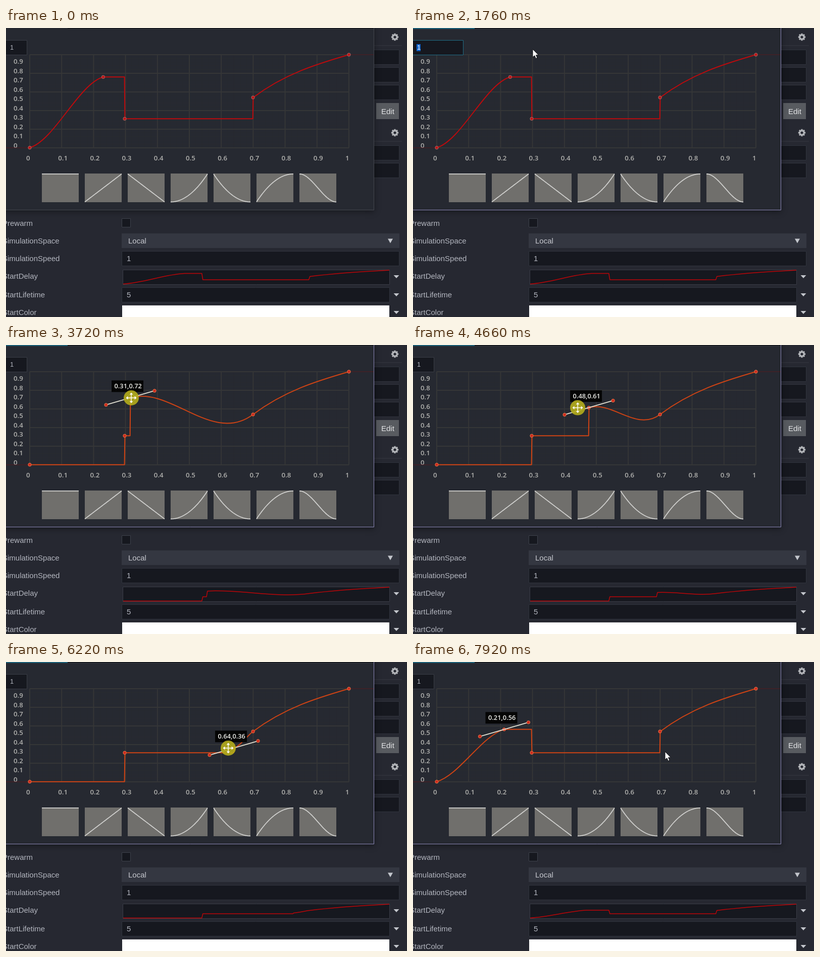
An HTML page with a canvas that plays this animation: 794x574 px, repeating every 8000 ms.

```html
<!DOCTYPE html>
<html lang="en">
<head>
<meta charset="utf-8">
<title>Curve editor</title>
<style>
html, body { margin: 0; width: 100%; height: 100%; overflow: hidden; background: #262831; }
canvas { display: block; width: 794px; height: 574px; }
</style>
</head>
<body>
<canvas id="stage" width="794" height="574"></canvas>
<script>
const ctx = document.getElementById('stage').getContext('2d');
const LOOP = 8000, STEP = 78.2, FIRST = 120;
const UI = '"Liberation Sans", Arial, sans-serif';
const NUM = '"Open Sans", "Noto Sans", sans-serif';
const DARK = '#16181f', EDGE = '#31343e', TEXT = '#b3b6bf';

// Events of the session, in ms
const HOVER = 885, FOCUS = 965, BLUR = 1912, GRAB = 3242, RELEASE = 7292;

// Free pointer: time, x, y
const roam = [
  [FIRST, 767, 556], [890, 26, 38], [1450, 26, 38], [1760, 237, 42], [2140, 237, 42],
  [2290, 191, 109], [2600, 187, 98], [RELEASE, 176, 134], [7840, 499, 178]
];

// Dragged key: time, x, y, and how far the pointer runs ahead in x
const drag = [
  [3400, 192.4, 97.4, -5], [3717, 246, 105, 2], [4380, 432, 112, -4], [4656, 348, 124.6, -22],
  [5300, 172, 138, -4], [5594, 223, 154, 26], [6080, 462, 171, -6], [6220, 451, 171, -11],
  [6620, 190, 149, -8], [7140, 180.5, 134, -4]
];

const clamp01 = v => Math.max(0, Math.min(1, v));

// Monotone cubic through the key points: smooth on the way, at rest where it turns
function along(track, t) {
  const last = track.length - 1;
  const secant = (i, c) => (track[i + 1][c] - track[i][c]) / (track[i + 1][0] - track[i][0]);
  const slope = (i, c) => {
    if (i === 0 || i === last) return 0;
    const a = secant(i - 1, c), b = secant(i, c);
    return a * b > 0 ? 2 * a * b / (a + b) : 0;
  };
  let i = 0;
  while (i < last - 1 && t >= track[i + 1][0]) i++;
  const p = track[i], q = track[i + 1], d = q[0] - p[0], u = clamp01((t - p[0]) / d);
  const ease = u * u * (3 - 2 * u);
  return p.slice(1).map((from, k) => from + (q[k + 1] - from) * ease +
    d * u * (1 - u) * ((1 - u) * slope(i, k + 1) - u * slope(i + 1, k + 1)));
}

function box(x, y, w, h, fill, edge) {
  ctx.fillStyle = fill;
  ctx.fillRect(x, y, w, h);
  if (edge) {
    ctx.strokeStyle = edge;
    ctx.lineWidth = 1;
    ctx.strokeRect(x + 0.5, y + 0.5, w - 1, h - 1);
  }
}

function text(str, x, y, color, font) {
  ctx.fillStyle = color;
  ctx.font = font;
  ctx.fillText(str, x, y);
}

function line(points, color, width) {
  ctx.beginPath();
  points.forEach(([x, y]) => ctx.lineTo(x, y));
  ctx.strokeStyle = color;
  ctx.lineWidth = width;
  ctx.stroke();
}

function shape(points, fill) {
  ctx.beginPath();
  points.forEach(([x, y]) => ctx.lineTo(x, y));
  ctx.closePath();
  ctx.fillStyle = fill;
  ctx.fill();
}

function disc(x, y, r, fill, edge) {
  ctx.beginPath();
  ctx.arc(x, y, r, 0, Math.PI * 2);
  ctx.fillStyle = fill;
  ctx.fill();
  if (edge) {
    ctx.strokeStyle = edge;
    ctx.lineWidth = 1;
    ctx.stroke();
  }
}

const caret = (x, y, w, h) =>
  shape([[x - w / 2, y - h / 2], [x + w / 2, y - h / 2], [x, y + h / 2]], '#c3c6cc');

function gear(x, y) {
  ctx.save();
  ctx.translate(x, y);
  ctx.fillStyle = '#b4b6ba';
  for (let i = 0; i < 8; i++) {
    ctx.fillRect(-1.6, -7.2, 3.2, 4);
    ctx.rotate(Math.PI / 4);
  }
  ctx.restore();
  ctx.beginPath();
  ctx.arc(x, y, 4.2, 0, Math.PI * 2);
  ctx.strokeStyle = '#b4b6ba';
  ctx.lineWidth = 3.2;
  ctx.stroke();
}

// Keys of the edited curve; "step" keys hold the value on both sides
function curveKeys([x, y]) {
  return [
    { t: 0, v: 0, slope: 1 },
    { t: (x - 47) / 632, v: (238 - y) / 185, slope: 1, moved: true },
    { t: 0.2975, v: 0.311, step: true },
    { t: 0.6995, v: 0.54, slope: 2.56 },
    { t: 1, v: 1, slope: 1 }
  ].sort((p, q) => p.t - q.t);
}

function strokeCurve(keys, X, Y, color, width, slant) {
  ctx.beginPath();
  ctx.moveTo(X(0), Y(keys[0].v));
  for (let i = 1; i < keys.length; i++) {
    const p = keys[i - 1], q = keys[i], d = (q.t - p.t) / 3;
    if (p.step || q.step) {
      ctx.lineTo(X(q.t) - slant, Y(p.v));
      ctx.lineTo(X(q.t) + slant, Y(q.v));
    } else {
      ctx.bezierCurveTo(X(p.t + d), Y(p.v + p.slope * d),
        X(q.t - d), Y(q.v - q.slope * d), X(q.t), Y(q.v));
    }
  }
  ctx.strokeStyle = color;
  ctx.lineWidth = width;
  ctx.lineJoin = 'round';
  ctx.stroke();
}

function drawPage(keys) {
  const font = '15px ' + UI;
  const label = (name, y) => text(name, -7, y, TEXT, font);
  box(0, 0, 794, 574, '#262831');

  // Right column, two sections
  [18, 208].forEach((y, section) => {
    gear(770, y);
    box(600, y + 16.5, 184, 1, '#363943');
    for (let i = 0; i < 3 - section; i++) box(600, y + 25 + 35 * i, 179, 30, DARK, EDGE);
  });
  box(733, 149, 45, 32, '#585b60');
  text('Edit', 743, 171, '#e2e3e5', font);

  label('Prewarm', 393);
  box(229, 378, 18, 18, DARK, '#3d414b');

  label('SimulationSpace', 428);
  box(229, 408, 550, 29, '#343741');
  text('Local', 242, 428, '#c6c8ce', font);
  caret(761, 423, 10, 9);

  label('SimulationSpeed', 463);
  box(229, 443, 550, 30, DARK, EDGE);
  text('1', 239, 463, TEXT, font);

  label('StartDelay', 498);
  box(231, 480, 529, 30, DARK, '#3a3d47');
  strokeCurve(keys, t => 232 + 527 * t, v => 508.4 - 27.4 * v, '#bd0508', 1.5, 1);

  label('StartLifetime', 535);
  box(229, 515, 531, 30, DARK, EDGE);
  text('5', 239, 535, TEXT, font);

  label('StartColor', 570);
  box(230, 551, 529, 23, '#ffffff');
  [494, 530, 565].forEach(y => caret(773, y, 11, 6));
}

const presets = [
  () => 1, u => u, u => 1 - u, u => u * u, u => (1 - u) ** 2,
  u => 1 - (1 - u) ** 2, u => 1 - u * u * (3 - 2 * u)
];

function drawGrid() {
  const rule = (i, a, b) =>
    line([a, b], i % 5 ? 'rgba(56,54,52,0.13)' : '#353637', i % 5 ? 1 : 2);
  for (let i = 0; i <= 50; i++) {
    const x = 47 + 12.64 * i;
    rule(i, [x, 53], [x, 238]);
  }
  for (let i = 0; i <= 25; i++) {
    const y = 53 + 7.4 * i;
    rule(i, [47, y], [679, y]);
  }
  const font = '600 13.3px ' + NUM;
  for (let i = 0; i <= 10; i++) {
    const name = i % 10 ? (i / 10).toFixed(1) : String(i / 10);
    text(name, 40 + 63.2 * i, 262.5, '#b1b1ae', font);
    if (i < 10) text(name, 15, 237.5 - 18.45 * i, '#b1b1ae', font);
  }
}

function drawPanel(focused) {
  ctx.save();
  ctx.shadowColor = 'rgba(0,0,0,0.4)';
  ctx.shadowBlur = 12;
  ctx.shadowOffsetY = 3;
  box(-20, -20, 749, 382, '#262931');
  ctx.restore();
  box(122, 0, 606, 2, '#16191f');
  box(122, 2, 606, 1, '#34373f');
  if (focused) box(0, 0, 122, 2, '#1a6078');
  line([[0, 361.5], [728.5, 361.5], [728.5, 0]], focused ? '#8c88b8' : '#454850', 1);
  drawGrid();

  presets.forEach((f, n) => {
    const x = 71 + 85 * n, pts = [];
    box(x, 289, 73, 57, '#706f6c');
    for (let i = 0; i <= 30; i++) pts.push([x + 73 * i / 30, 345.5 - 55.7 * f(i / 30)]);
    line(pts, '#cfcfcd', 1.8);
  });
}

function drawChart(keys, selected) {
  const X = t => 47 + 632 * t, Y = v => 237.7 - 184.7 * v;
  line([[0, 238], [47, 238]], '#541a1e', 1);
  line([[679, 53], [728, 53]], '#541a1e', 1);
  strokeCurve(keys, X, Y, selected ? '#cf4314' : '#bd0a0d', 2, 0.4);
  const dot = (x, y) =>
    disc(x, y, 3.2, selected ? '#d02a1c' : '#c21416', selected ? '#e0784e' : '#97706c');
  keys.forEach(k => dot(X(k.t), Y(k.v)));
  if (!selected) return;

  const key = keys.find(k => k.moved), x = X(key.t), y = Y(key.v);
  line([[x - 48, y + 14], [x + 48, y - 14]], '#e4e2d4', 1.8);
  dot(x - 48, y + 14);
  dot(x + 48, y - 14);
  box(x - 37, y - 34.5, 63, 23, '#050505');
  const tip = key.t.toFixed(2) + ',' + key.v.toFixed(2);
  text(tip, x - 31.5, y - 18.5, '#eeeeea', '600 12.8px ' + NUM);
}

function drawInput(t) {
  const grow = clamp01((t - FOCUS + 60) / 190) - clamp01((t - BLUR + 60) / 190);
  const focused = t >= FOCUS && t < BLUR;
  box(-1, 24, 43 + 58 * grow, 30, DARK, t >= HOVER && t < BLUR ? '#1f6d86' : '#3a3d46');
  if (focused) box(7, 32, 8, 14, '#1464c8');
  text('1', 8, 43, focused ? '#ffffff' : TEXT, '13px ' + UI);
}

function moveCursor() {
  for (let i = 0; i < 4; i++) {
    line([[0, 0], [0, -8]], '#ffffff', 1.4);
    shape([[-3.4, -6.6], [3.4, -6.6], [0, -10.5]], '#ffffff');
    ctx.rotate(Math.PI / 2);
  }
}

function textCursor() {
  line([[0.5, -7], [0.5, 8]], '#e8e8e8', 1);
  [-7, 8].forEach(d => line([[-2, d], [3, d]], '#e8e8e8', 1));
}

function arrowCursor() {
  shape([[0, 0], [0, 16], [3.8, 12.8], [6.3, 18.5], [9, 17.3], [6.5, 11.8], [11.5, 11.8]], '#ffffff');
  ctx.strokeStyle = '#101014';
  ctx.lineWidth = 1;
  ctx.stroke();
}

function drawPointer(t, [keyX, keyY, lead]) {
  if (t < FIRST) return;
  const dragging = t >= GRAB && t < RELEASE;
  const [x, y] = dragging ? [keyX + lead, keyY] : along(roam, t);
  const pressed = dragging || t >= FOCUS && t < FOCUS + 320 || t >= BLUR && t < BLUR + 150;
  if (pressed) disc(x, y, 15, 'rgba(181,173,28,0.9)');
  ctx.save();
  ctx.translate(x, y);
  if (dragging) moveCursor();
  else if (x < 45 && y < 54) textCursor();
  else arrowCursor();
  ctx.restore();
}

function render(now) {
  const raw = now % LOOP;
  const t = raw < FIRST ? 0 : FIRST + Math.floor((raw - FIRST) / STEP + 0.27) * STEP;
  const held = along(drag, t), keys = curveKeys(held);
  drawPage(keys);
  drawPanel(t >= FOCUS);
  drawChart(keys, t >= GRAB);
  drawInput(t);
  drawPointer(t, held);
}

const start = performance.now();
function tick() {
  render(performance.now() - start);
  requestAnimationFrame(tick);
}
tick();
</script>
</body>
</html>
```
